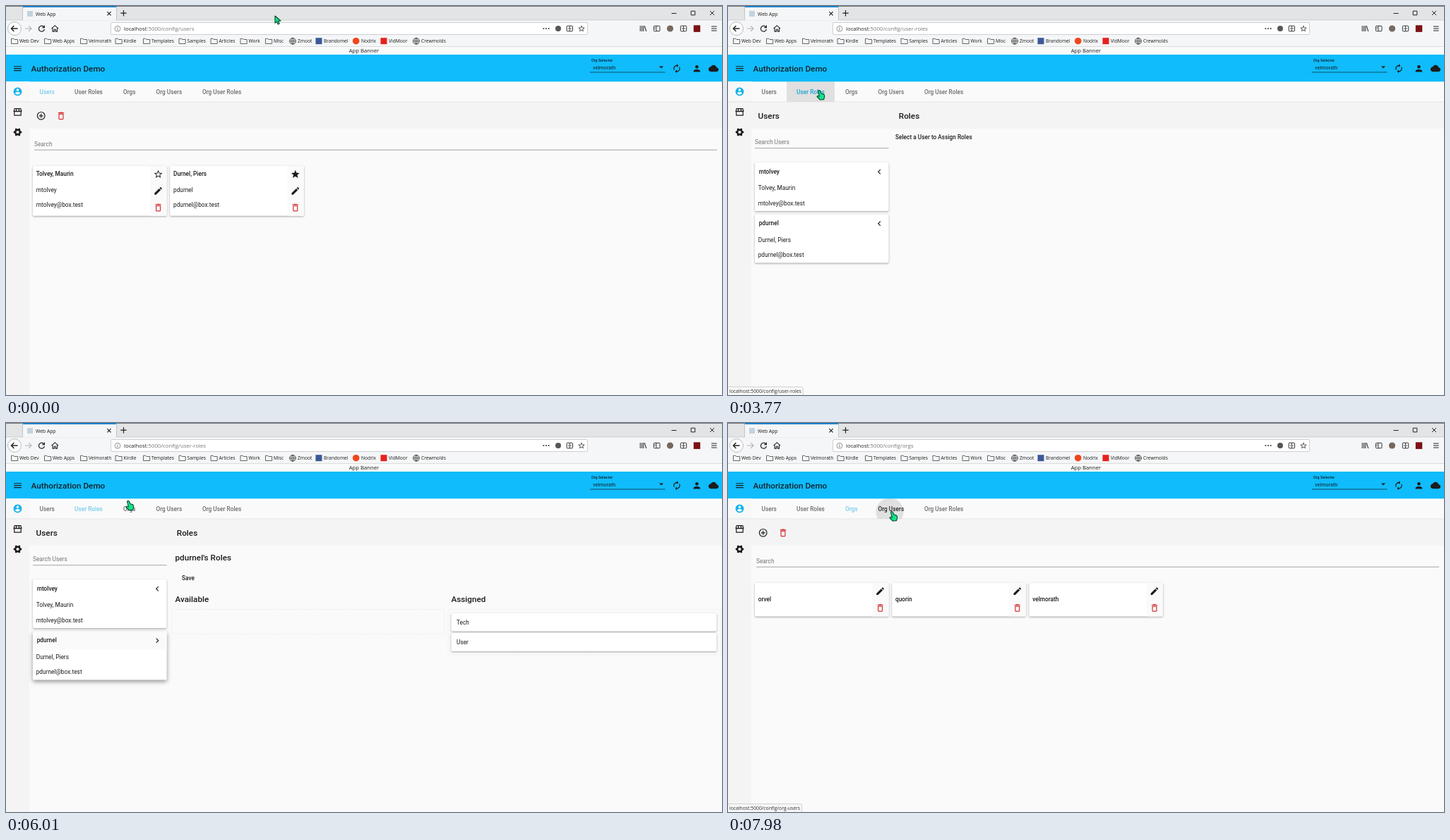
These frames come from a looping animation (1014x552 px, 8000 ms). An HTML page with a canvas:

```html
<!DOCTYPE html>
<html lang="en">
<head>
<meta charset="utf-8">
<title>Authorization Demo</title>
<style>
html, body { margin: 0; width: 100%; height: 100%; overflow: hidden; background: #fafafa; }
canvas { display: block; width: 1014px; height: 552px; }
</style>
</head>
<body>
<canvas id="stage"></canvas>
<script>
const W = 1014, H = 552, LOOP = 8000;
const canvas = document.getElementById('stage');
const ctx = canvas.getContext('2d');
const dpr = window.devicePixelRatio || 1;
canvas.width = W * dpr;
canvas.height = H * dpr;

const UI = '"Open Sans", "Noto Sans", sans-serif';
const APP = 'Roboto, Arial, sans-serif';
const INK = '#1c1c1c', RED = '#d32f2f', BLUE = '#10bcfb';

const ICONS = {
  menu: 'M3 18h18v-2H3zM3 13h18v-2H3zM3 6v2h18V6z',
  star: 'M12 17.27L18.18 21l-1.64-7.03L22 9.24l-7.19-.61L12 2 9.19 8.63 2 9.24l5.46 4.73L5.82 21z',
  starLine: 'M22 9.24l-7.19-.62L12 2 9.19 8.63 2 9.24l5.46 4.73L5.82 21 12 17.27 18.18 21l-1.63-7.03zM12 15.4l-3.76 2.27 1-4.28-3.32-2.88 4.38-.38L12 6.1l1.71 4.04 4.38.38-3.32 2.88 1 4.28z',
  edit: 'M3 17.25V21h3.75L17.81 9.94l-3.75-3.75zM20.71 7.04c.39-.39.39-1.02 0-1.41l-2.34-2.34c-.39-.39-1.02-.39-1.41 0l-1.83 1.83 3.75 3.75z',
  trash: 'M6 19c0 1.1.9 2 2 2h8c1.1 0 2-.9 2-2V7H6zM8 9h8v10H8zM15.5 4l-1-1h-5l-1 1H5v2h14V4z',
  add: 'M13 7h-2v4H7v2h4v4h2v-4h4v-2h-4zM12 2a10 10 0 1 0 0 20a10 10 0 1 0 0-20zM12 4a8 8 0 1 1 0 16a8 8 0 1 1 0-16z',
  account: 'M12 2a10 10 0 1 0 0 20a10 10 0 1 0 0-20zM12 5a3 3 0 1 1 0 6a3 3 0 1 1 0-6zM12 19.2c-2.5 0-4.71-1.28-6-3.22.03-1.99 4-3.08 6-3.08s5.97 1.09 6 3.08c-1.29 1.94-3.5 3.22-6 3.22z',
  person: 'M12 4a4 4 0 1 0 0 8a4 4 0 1 0 0-8zM12 14c-2.67 0-8 1.34-8 4v2h16v-2c0-2.66-5.33-4-8-4z',
  cloud: 'M19.35 10.04C18.67 6.59 15.64 4 12 4 9.11 4 6.6 5.64 5.35 8.04 2.34 8.36 0 10.91 0 14c0 3.31 2.69 6 6 6h13c2.76 0 5-2.24 5-5 0-2.64-2.05-4.78-4.65-4.96z',
  sync: 'M12 6v3l4-4-4-4v3c-4.42 0-8 3.58-8 8 0 1.57.46 3.03 1.24 4.26L6.7 14.8c-.45-.83-.7-1.79-.7-2.8 0-3.31 2.69-6 6-6zM18.76 7.74L17.3 9.2c.44.84.7 1.79.7 2.8 0 3.31-2.69 6-6 6v-3l-4 4 4 4v-3c4.42 0 8-3.58 8-8 0-1.57-.46-3.03-1.24-4.26z',
  left: 'M15.41 7.41L14 6l-6 6 6 6 1.41-1.41L10.83 12z',
  right: 'M8.59 16.59L10 18l6-6-6-6-1.41 1.41L13.17 12z',
  store: 'M4 3h16l2 7v2h-1v9H3v-9H2v-2zM5 12v7h14v-7zM5.5 5L4.3 9.5h3.2L8 5zM10 5l-.5 4.5h5L14 5zM16 5l.5 4.5h3.2L18.5 5z'
};
for (const k in ICONS) ICONS[k] = new Path2D(ICONS[k]);

const USERS = [
  { name: 'Tolvey, Maurin', login: 'mtolvey', mail: 'mtolvey@box.test', star: 'starLine' },
  { name: 'Durnel, Piers', login: 'pdurnel', mail: 'pdurnel@box.test', star: 'star' }
];
const ORGS = ['orvel', 'quorin', 'velmorath'];

const BOOKMARKS = [
  ['folder', 'Web Dev', 7], ['folder', 'Web Apps', 54], ['folder', 'Velmorath', 105],
  ['folder', 'Kirdle', 154.5], ['folder', 'Templates', 194], ['folder', 'Samples', 244.5],
  ['folder', 'Articles', 289.5], ['folder', 'Work', 331.5], ['folder', 'Misc', 367],
  ['globe', 'Zmoot', 401], ['square', 'Brandomel', 438, '#3b5998'], ['disc', 'Nodrix', 491, '#f0461e'],
  ['square', 'VidMoor', 530, '#e8201c'], ['globe', 'Crewmolds', 576]
];

const TABS = [
  { label: 'Users', x: 47.5, l: 33, r: 83, path: 'users' },
  { label: 'User Roles', x: 97, l: 83, r: 151, path: 'user-roles' },
  { label: 'Orgs', x: 166, l: 151, r: 198, path: 'orgs' },
  { label: 'Org Users', x: 212.5, l: 198, r: 264, path: 'org-users' },
  { label: 'Org User Roles', x: 278, l: 264, r: 347, path: 'org-user-roles' }
];

// Each hover covers one tab; the click starts its ripple.
const HOVERS = [
  { tab: 1, from: 3080, to: 3900, click: 3220, cx: 129, cy: 121 },
  { tab: 2, from: 6180, to: 7080, click: 6220, cx: 177, cy: 122 },
  { tab: 3, from: 7250, to: 8000, click: 7890, cx: 229, cy: 126 }
];
const ROLES_AT = 3380, SELECT_AT = 4730, ORGS_AT = 6350;

// time, x, y of the pointer tip
const POINTER = [
  [0, 381, 14], [2130, 381, 14], [2170, 379, 14], [2970, 145, 131], [3040, 136, 122],
  [3200, 128.5, 120], [3840, 128.5, 120], [4420, 240, 300], [4640, 225, 310], [5640, 225, 310],
  [5920, 176, 92], [6040, 172, 114], [6180, 172, 114], [6260, 177, 121], [7010, 177, 121],
  [7460, 264, 130], [7780, 231.5, 126], [8000, 231.5, 126]
];

const clamp = v => Math.max(0, Math.min(1, v));
const progress = (t, from, span) => clamp((t - from) / span);

function pointerAt(t) {
  let i = 0;
  while (i < POINTER.length - 2 && t >= POINTER[i + 1][0]) i++;
  const [t0, x0, y0] = POINTER[i], [t1, x1, y1] = POINTER[i + 1];
  const p = progress(t, t0, t1 - t0), e = p * p * (3 - 2 * p);
  return [x0 + (x1 - x0) * e, y0 + (y1 - y0) * e];
}

function rect(x, y, w, h, color) {
  ctx.fillStyle = color;
  ctx.fillRect(x, y, w, h);
}

function box(x, y, w, h, r, fill, stroke, width = 1) {
  ctx.beginPath();
  ctx.roundRect(x, y, w, h, r);
  if (fill) { ctx.fillStyle = fill; ctx.fill(); }
  if (stroke) { ctx.strokeStyle = stroke; ctx.lineWidth = width; ctx.stroke(); }
}

function disc(x, y, r, fill, stroke, width = 1) {
  box(x - r, y - r, 2 * r, 2 * r, r, fill, stroke, width);
}

// y is the middle of the capital letters.
function text(str, x, y, size = 8.3, color = INK, weight = 400, family = APP) {
  ctx.font = `${weight} ${size}px ${family}`;
  ctx.fillStyle = color;
  ctx.fillText(str, x, y + size * 0.36);
}
const bold = (str, x, y, size, color) => text(str, x, y, size, color, 500);
const ui = (str, x, y, size = 6.7, color = '#1a1a1a') => text(str, x, y, size, color, 400, UI);

function icon(name, x, y, color = INK, size = 14.2) {
  ctx.save();
  ctx.translate(x - size / 2, y - size / 2);
  ctx.scale(size / 24, size / 24);
  ctx.fillStyle = color;
  ctx.fill(ICONS[name], 'evenodd');
  ctx.restore();
}

function line(d, x, y, color = '#333', width = 1.1) {
  ctx.save();
  ctx.translate(x, y);
  ctx.strokeStyle = color;
  ctx.lineWidth = width;
  ctx.stroke(new Path2D(d));
  ctx.restore();
}

function shape(d, x, y, fill, stroke) {
  ctx.save();
  ctx.translate(x, y);
  const p = new Path2D(d);
  ctx.lineJoin = 'round';
  ctx.fillStyle = fill;
  ctx.fill(p);
  if (stroke) { ctx.strokeStyle = stroke; ctx.lineWidth = 1.1; ctx.stroke(p); }
  ctx.restore();
}

function card(x, y, w, h, lift = 0) {
  ctx.save();
  ctx.shadowColor = `rgba(0,0,0,${0.36 + lift * 0.06})`;
  ctx.shadowBlur = (2.6 + lift * 3.5) * dpr;
  ctx.shadowOffsetY = (1 + lift * 1.4) * dpr;
  box(x, y, w, h, 1.5, '#fff');
  ctx.restore();
}

function gear(x, y) {
  ctx.beginPath();
  for (let i = 0; i < 24; i++) {
    const r = i % 4 < 2 ? 5.9 : 4.5, a = (i - 0.5) * Math.PI / 12;
    ctx.lineTo(x + r * Math.cos(a), y + r * Math.sin(a));
  }
  ctx.closePath();
  ctx.moveTo(x + 2.1, y);
  ctx.arc(x, y, 2.1, 0, 7);
  ctx.fillStyle = INK;
  ctx.fill('evenodd');
}

function bookmark([kind, label, x, color]) {
  if (kind === 'folder') line('M.5 .5h3.3l1 1.2h4.9v6H.5z', x, 45.8, '#555', 0.9);
  if (kind === 'globe') {
    disc(x + 5, 49.8, 4.4, null, '#333', 0.9);
    line('M-4.4 0h8.8M0-4.4v8.8M0-4.4q-4.4 4.4 0 8.8M0-4.4q4.4 4.4 0 8.8', x + 5, 49.8, '#333', 0.7);
  }
  if (kind === 'square') rect(x + 0.5, 45.2, 9, 9, color);
  if (kind === 'disc') disc(x + 4.7, 49.7, 4.8, color);
  ui(label, x + 12, 50);
}

function splitBox(x, y) {
  box(x - 4.2, y - 3.8, 8.4, 7.6, 1, null, '#333', 1);
  line('M0-3.8v7.6M-2.5 0h1.8M.7 0h1.8', x, y, '#333', 0.9);
}

function browser(page) {
  rect(0, 0, W, 20, '#e3e4e6');
  rect(0, 20, W, 37.5, '#f5f6f7');
  rect(0, 19.5, W, 0.8, '#c6c7c9');
  rect(0, 0, W, 1, '#77787b');
  rect(23.5, 0, 133, 20.5, '#f5f6f7');
  rect(23.5, 0, 133, 1.8, '#0a7cc8');
  rect(23, 1, 0.8, 19, '#b9babc');
  rect(156.2, 1, 0.8, 19, '#b9babc');
  rect(30, 7, 8, 8, '#c3d3de');
  ui('Web App', 42, 11.2, 6.8);
  line('M-2.6-2.6l5.2 5.2M2.6-2.6l-5.2 5.2', 146, 10.8, '#222', 1.2);
  line('M-4.2 0h8.4M0-4.2v8.4', 166.5, 10.2, '#222', 1.2);
  line('M-3.5 0h7', 946, 10.5, '#222', 1);
  line('M-2.8-2.8h5.6v5.6h-5.6z', 973, 10, '#222', 1);
  line('M-3-3l6 6M3-3l-6 6', 1000, 10, '#222', 1);

  disc(12, 32, 9.5, '#fcfcfc', '#b4b4b6', 0.9);
  line('M4.5 0h-9M-.6-3.9l-3.9 3.9 3.9 3.9', 12, 32, '#222', 1.4);
  line('M-4.5 0h9M.6-3.9l3.9 3.9-3.9 3.9', 31.5, 32, '#b4b4b6', 1.2);
  line('M3.3-2a4 4 0 1 0 .6 2.8M3.9-4.4v3h-3', 50.5, 32, '#222', 1.2);
  line('M-4.8 .2l4.8-4.5 4.8 4.5M-3.2-.5v4.6h2.2v-2.8h2v2.8h2.2v-4.6', 69.3, 32, '#222', 1.1);

  box(148.5, 23.5, 675, 17, 1.5, '#fff', '#cbcbcd', 0.9);
  disc(158, 32.2, 3.9, null, '#777', 0.8);
  line('M0-.6v2.8M0-2.2v.9', 158, 32.2, '#666', 0.9);
  ui('localhost', 167, 32.5, 7.75, '#222');
  const host = ctx.measureText('localhost').width;
  ui(':5000/config/' + page, 167 + host, 32.5, 7.75, '#777');
  for (const dx of [-3.6, 0, 3.6]) disc(765 + dx, 32, 1.1, '#444');
  disc(782, 32, 4, '#55565a');
  splitBox(798.3, 32);
  icon('starLine', 815, 32, '#333', 11.5);

  line('M-3.7-4v8M-1.4-4v8M.8-4v8M2.2-3.8l2.6 7.8', 902, 32, '#333', 1.1);
  box(917.4, 28.3, 8.6, 7.4, 1, null, '#333', 1);
  line('M-.6-3.7v7.4M-3-1.6h1.4M-3 .4h1.4', 921.7, 32, '#333', 0.9);
  disc(940.5, 32, 4.6, '#77685f');
  splitBox(959.5, 32);
  rect(973.8, 27.3, 9.4, 9.6, '#7c1113');
  line('M-3.8-3h7.6M-3.8 0h7.6M-3.8 3h7.6', 1002.8, 32, '#222', 1.1);
  BOOKMARKS.forEach(bookmark);
}

function header() {
  rect(0, 57, W, 12, '#fafafa');
  rect(0, 57, W, 0.7, '#d0d0d2');
  ui('App Banner', 485.7, 63.4, 7.7);
  rect(0, 69, W, 38.3, BLUE);
  icon('menu', 16.5, 88.7);
  bold('Authorization Demo', 35.5, 88.6, 11.75, '#12222a');
  bold('Org Selector', 829, 77, 5.45, '#123');
  text('velmorath', 831.3, 87, 7.2, '#12222a');
  shape('M-3-1.5h6l-3 3z', 928, 87, INK);
  rect(827, 93.6, 106.5, 0.8, '#12323f');
  icon('sync', 950, 88.7);
  icon('person', 978.4, 88.7);
  icon('cloud', 1002, 88.5);
}

function ripple(h, t) {
  if (t < h.click) return;
  const tab = TABS[h.tab];
  const far = Math.hypot(Math.max(h.cx - tab.l, tab.r - h.cx), 19);
  const grow = 1 - Math.pow(1 - progress(t, h.click, 450), 3);
  const alpha = 0.104 * (1 - progress(t, h.to, 300));
  if (!alpha) return;
  ctx.save();
  ctx.beginPath();
  ctx.rect(tab.l, 107.3, tab.r - tab.l, 28.4);
  ctx.clip();
  disc(h.cx, h.cy, far * grow, `rgba(0,0,0,${alpha})`);
  ctx.restore();
}

function tabs(active, hover, t) {
  rect(0, 107.3, 33, H - 107.3, '#f4f4f4');
  rect(0, 107.3, 33, 28.4, '#f8f8f8');
  rect(33, 136, W - 33, 38.3, '#f4f4f4');
  rect(0, 135.6, W, 0.7, '#dedede');
  icon('account', 16.5, 121.5, '#14b4ec');
  icon('store', 16.5, 150.3);
  gear(16.5, 179);
  HOVERS.forEach(h => ripple(h, t));
  TABS.forEach((tab, i) => {
    const over = hover && hover.tab === i;
    const color = i === active ? (over ? '#1ba3da' : '#7accea') : (over ? '#262626' : '#6c6c6c');
    bold(tab.label, tab.x, 121.7, 8.3, color);
  });
}

function listTools() {
  icon('add', 49.7, 155.8);
  icon('trash', 78, 155.8, RED);
  text('Search', 40, 195.8, 8.3, '#757575');
  rect(40, 203.8, 967, 0.8, '#8f8f8f');
}

function tile(i, h, icons) {
  const x = 38 + i * 194.2;
  card(x, 226.8, 189.6, h);
  rect(x + 166.3, 226.8, 23.3, h, '#fafafa');
  icons.forEach((name, k) => icon(name, x + 177.6, 238.7 + k * 23.7, name === 'trash' ? RED : INK));
  return x + 4.8;
}

function usersPage() {
  listTools();
  USERS.forEach((u, i) => {
    const x = tile(i, 71, [u.star, 'edit', 'trash']);
    bold(u.name, x, 238.5);
    text(u.login, x, 260.7);
    text(u.mail, x, 282);
  });
}

function orgsPage() {
  listTools();
  ORGS.forEach((name, i) => bold(name, tile(i, 47.6, ['edit', 'trash']), 250));
}

function userCard(u, y, lift) {
  card(38, y, 189.6, 69, lift);
  if (lift) rect(38, y, 189.6, 26, '#fafafa');
  bold(u.login, 43.7, y + 12.7);
  icon(lift ? 'right' : 'left', 214.3, y + 13.2);
  text(u.name, 42.7, y + 36.4);
  text(u.mail, 42.7, y + 57.8);
}

function dropZone(x, h) {
  ctx.setLineDash([1.5, 1.5]);
  box(x, 264.5, 386, h, 0, null, '#e6e6e6', 0.8);
  ctx.setLineDash([]);
}

function assignPanel() {
  bold(USERS[1].login + "'s Roles", 239.4, 190.8, 11.75);
  bold('Save', 249, 220.4);
  bold('Available', 239.4, 250, 11.75);
  bold('Assigned', 630.4, 250, 11.75);
  dropZone(235, 34.5);
  dropZone(626, 64.5);
  ['Tech', 'User'].forEach((role, i) => {
    card(630.5, 269.6 + i * 28.4, 376, 26);
    text(role, 638, 282.7 + i * 28.4);
  });
}

function tooltip(t) {
  const show = progress(t, 4910, 200), alpha = 0.9 * show * (1 - progress(t, 5640, 150));
  if (!alpha) return;
  const s = Math.min(1, show * 2);
  ctx.save();
  ctx.globalAlpha = alpha;
  ctx.translate(214.6, 336);
  ctx.scale(s, s);
  box(-15.8, -7, 31.6, 14, 2, '#616161');
  text('Deselect', -11.4, 0, 5.9, '#fff');
  ctx.restore();
}

function rolesPage(t) {
  bold('Users', 42.6, 155.4, 11.75);
  bold('Roles', 241.8, 155.4, 11.75);
  text('Search Users', 38, 193.2, 8.3, '#757575');
  rect(38, 201.4, 189.6, 0.8, '#8f8f8f');
  userCard(USERS[0], 222, 0);
  userCard(USERS[1], 295.5, progress(t, SELECT_AT, 200));
  if (t < SELECT_AT) bold('Select a User to Assign Roles', 237, 186.2);
  else assignPanel();
  tooltip(t);
}

function status(hover) {
  const label = 'localhost:5000/config/' + TABS[hover.tab].path;
  ctx.font = `400 6.8px ${UI}`;
  const w = ctx.measureText(label).width + 4.5;
  box(-2, 540.5, w + 2, 14, [0, 2, 0, 0], '#f7f7f8', '#c9c9cb', 0.8);
  ui(label, 2, 546.7, 6.8, '#333');
}

function pointer(t, onRoles) {
  const [x, y] = pointerAt(t);
  const overTab = x > 33 && x < 347 && y > 107 && y < 136;
  const overRow = onRoles && x < 228 && y > 295 && y < 322;
  const d = overTab || overRow
    ? 'M-1 .5Q.3-1.4 2 .5L3.4 4 7.2 5.1Q8.4 6 8.1 9L7.2 12.6 1.8 13-2.4 8.9Q-2.2 7.2-.6 7.7L.9 8.2z'
    : 'M0 0V10.2L2.4 8.2 4.2 12 6.2 11 4.6 7.5 8 7z';
  shape(d, x, y, '#12e488', '#0c4730');
}

function draw(t) {
  const active = t < ROLES_AT ? 0 : t < ORGS_AT ? 1 : 2;
  const hover = HOVERS.find(h => t >= h.from && t < h.to);
  ctx.setTransform(dpr, 0, 0, dpr, 0, 0);
  rect(0, 0, W, H, '#fafafa');
  browser(TABS[active].path);
  header();
  tabs(active, hover, t);
  [usersPage, rolesPage, orgsPage][active](t);
  if (hover) status(hover);
  pointer(t, active === 1);
}

const start = performance.now();
function frame() {
  draw((performance.now() - start) % LOOP);
  requestAnimationFrame(frame);
}
frame();
</script>
</body>
</html>
```
